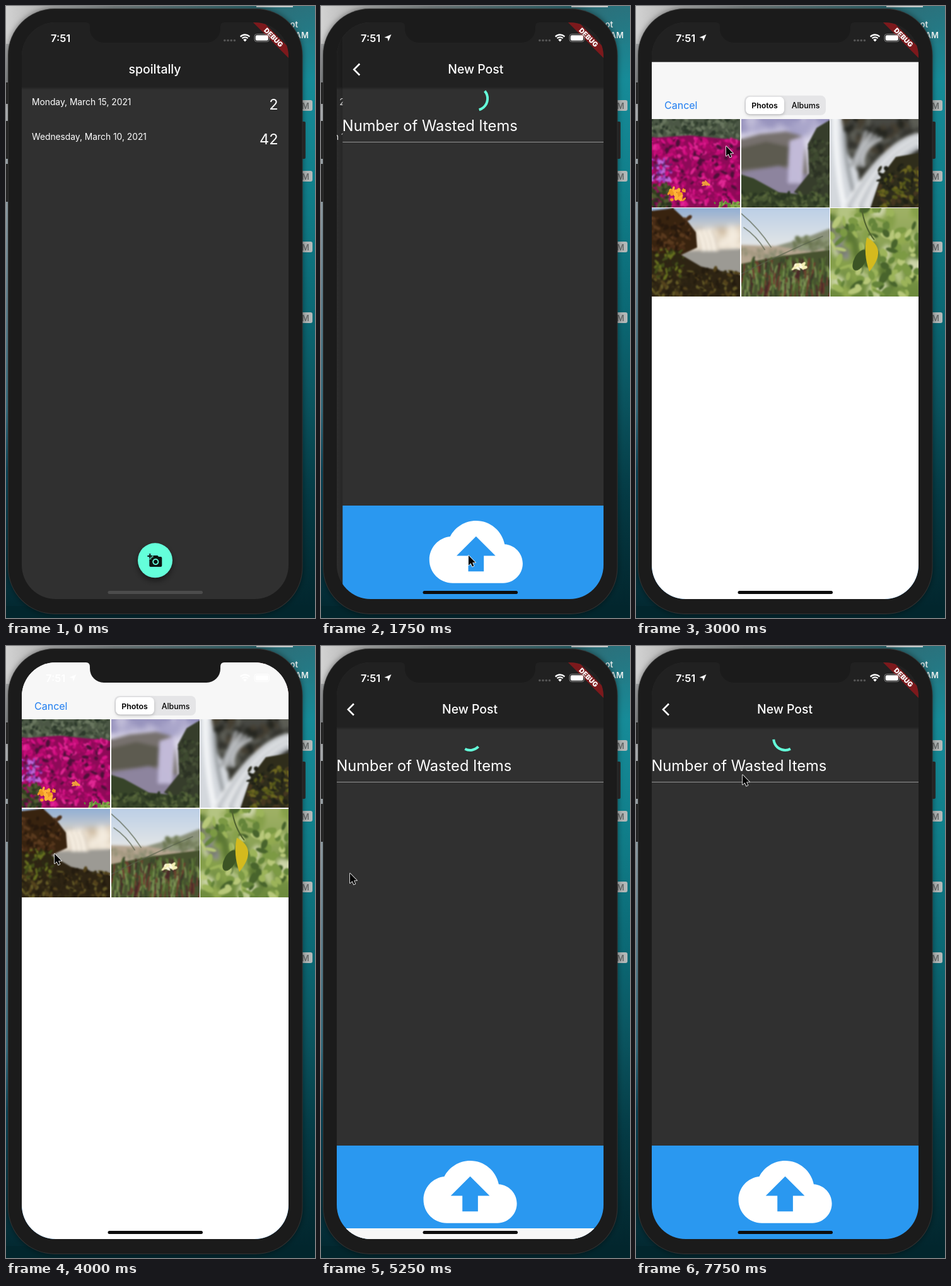
Write an HTML page with a canvas that moves like this. It is 490 by 969 pixels and loops after 8000 ms.

```html
<!DOCTYPE html>
<html lang="en">
<head>
<meta charset="utf-8">
<title>Food log demo</title>
<style>
html, body { margin: 0; width: 100%; height: 100%; overflow: hidden; background: #1b1b1b; }
canvas { display: block; width: 490px; height: 969px; }
</style>
</head>
<body>
<canvas id="stage" width="490" height="969"></canvas>
<script>
const ctx = document.getElementById('stage').getContext('2d');
const LOOP = 8000, STEP = 250;
const SCREEN = { x: 25, y: 26, w: 423, h: 913 };
const MID = SCREEN.x + SCREEN.w / 2;
const CELL = 140, PITCH = 141.5;

const CLOUD = new Path2D('M19.35 10.04C18.67 6.59 15.64 4 12 4 9.11 4 6.6 5.64 5.35 8.04 2.34 8.36 0 10.91 0 14c0 3.31 2.69 6 6 6h13c2.76 0 5-2.24 5-5 0-2.64-2.05-4.78-4.65-4.96zM14 13v4h-4v-4H7l5-5 5 5h-3z');
const CAMERA = new Path2D('M3 4V1h2v3h3v2H5v3H3V6H0V4h3zm3 6V7h3V4h7l1.83 2H21c1.1 0 2 .9 2 2v12c0 1.1-.9 2-2 2H5c-1.1 0-2-.9-2-2V10h3zm7 9c2.76 0 5-2.24 5-5s-2.24-5-5-5-5 2.24-5 5 2.24 5 5 5zm-3.2-5c0 1.77 1.43 3.2 3.2 3.2s3.2-1.43 3.2-3.2-1.43-3.2-3.2-3.2-3.2 1.43-3.2 3.2z');
const POINTER = new Path2D('M0 0V15.5L3.6 12.2 6 17.6 8.4 16.5 6.1 11.3H11z');
const LOCATION = new Path2D('M111.5 45L106.8 56 105.6 50.9 100.5 49.7z');

// Cursor: time, x, y
const CURSOR = [[250, 193, 203], [500, 256, 400], [750, 250, 700], [1000, 234, 870], [1750, 234, 870],
  [2500, 143, 222], [3000, 143, 222], [4000, 77, 329], [4500, 46, 360], [5500, 46, 360], [6500, 169, 204]];
// Spinner clock: time, elapsed
const SPIN = [[1530, 0], [2750, 1190], [5250, 3645], [7750, 6255]];

const clamp = v => Math.min(1, Math.max(0, v));
const smooth = v => v * v * (3 - 2 * v);
const linear = v => v;

function track(keys, t, ease) {
  let i = 0;
  while (i < keys.length - 2 && t > keys[i + 1][0]) i++;
  const [a, b] = [keys[i], keys[i + 1]];
  const k = ease(clamp((t - a[0]) / (b[0] - a[0])));
  return a.slice(1).map((v, n) => v + (b[n + 1] - v) * k);
}

function bezier(x1, y1, x2, y2) {
  const at = (s, p, q) => 3 * s * (1 - s) * (1 - s) * p + 3 * s * s * (1 - s) * q + s * s * s;
  return x => {
    if (x <= 0 || x >= 1) return clamp(x);
    let lo = 0, hi = 1;
    for (let i = 0; i < 24; i++) {
      const m = (lo + hi) / 2;
      if (at(m, x1, x2) < x) lo = m; else hi = m;
    }
    return at(lo, y1, y2);
  };
}
const pushEase = bezier(0.35, 0.91, 0.33, 0.97);
const arcEase = bezier(0.4, 0, 0.2, 1);

// Share of the distance still to go for a critically damped spring
function spring(seconds, speed) {
  const x = Math.max(0, seconds) * speed;
  return (1 + x) * Math.exp(-x);
}

function gradient(c, x0, y0, x1, y1, stops) {
  const g = c.createLinearGradient(x0, y0, x1, y1);
  stops.forEach(([at, color]) => g.addColorStop(at, color));
  return g;
}
function rect(x, y, w, h, color) {
  ctx.fillStyle = color;
  ctx.fillRect(x, y, w, h);
}
function round(x, y, w, h, r, color) {
  ctx.beginPath();
  ctx.roundRect(x, y, w, h, r);
  ctx.fillStyle = color;
  ctx.fill();
}
function text(str, x, y, font, color = '#fff', align = 'left') {
  ctx.font = font + ' Inter, sans-serif';
  ctx.fillStyle = color;
  ctx.textAlign = align;
  ctx.fillText(str, x, y);
}
function icon(path, x, y, scale, color) {
  ctx.save();
  ctx.translate(x, y);
  ctx.scale(scale, scale);
  ctx.fillStyle = color;
  ctx.fill(path);
  ctx.restore();
}

// Photos: soft gradients with a few shapes, painted once on 140 px tiles
function photo(seed, paint) {
  const tile = document.createElement('canvas');
  tile.width = tile.height = 140;
  const c = tile.getContext('2d');
  const rnd = () => (seed = seed * 16807 % 2147483647) / 2147483647;
  const fill = (top, bottom, end = 140) => {
    c.fillStyle = gradient(c, 0, 0, 0, end, [[0, top], [1, bottom]]);
    c.fillRect(0, 0, 140, 140);
  };
  const poly = (color, ...pts) => {
    c.fillStyle = color;
    c.beginPath();
    for (let i = 0; i < pts.length; i += 2) c.lineTo(pts[i], pts[i + 1]);
    c.fill();
  };
  const blobs = (n, x, y, w, h, size, colors) => {
    for (let i = 0; i < n; i++) {
      c.fillStyle = colors[i % colors.length];
      c.beginPath();
      c.ellipse(x + rnd() * w, y + rnd() * h, size * (0.5 + rnd()), size * (0.3 + rnd() * 0.5), rnd() * 3, 0, 7);
      c.fill();
    }
  };
  const sweep = (color, width, x0, y0, cx, cy, x1, y1) => {
    c.strokeStyle = color;
    c.lineWidth = width;
    c.beginPath();
    c.moveTo(x0, y0);
    c.quadraticCurveTo(cx, cy, x1, y1);
    c.stroke();
  };
  const soften = px => {
    c.filter = `blur(${px}px)`;
    c.drawImage(tile, 0, 0);
    c.filter = 'none';
  };
  paint({ c, rnd, fill, poly, blobs, sweep, soften });
  return tile;
}

const photos = [
  photo(11, ({ fill, poly, blobs, soften }) => {
    fill('#4c5846', '#3c4a38');
    blobs(160, 0, 0, 140, 28, 4, ['#3a4735', '#69765f', '#2b382a', '#55634c']);
    poly('#8e0a58', 0, 30, 60, 26, 140, 34, 140, 140, 0, 140);
    blobs(480, 0, 32, 140, 104, 4.5, ['#c50c78', '#d81488', '#8c0a58', '#b20a6c', '#e02894', '#4c1038', '#a60864']);
    blobs(45, 0, 64, 34, 34, 3.5, ['#a244c4', '#bc68d8', '#5a2868']);
    blobs(70, 0, 104, 30, 36, 4, ['#33421f', '#4f5c30', '#2a3420']);
    soften(0.8);
    blobs(26, 28, 110, 24, 18, 4, ['#f09a24', '#ffb438']);
    blobs(7, 80, 100, 9, 5, 3, ['#f0a03c']);
    blobs(22, 100, 132, 40, 8, 4, ['#5e8a38', '#86a64a']);
  }),
  photo(23, ({ fill, poly, blobs, sweep, soften }) => {
    fill('#8c88b6', '#dcd8ea', 28);
    blobs(16, 0, 4, 130, 14, 16, ['#a9a5ca', '#9793bd', '#c0bcd8']);
    soften(4);
    poly('#77716e', 0, 32, 30, 24, 72, 20, 100, 28, 112, 140, 0, 140);
    poly('#5d5b50', 0, 46, 40, 36, 76, 44, 76, 74, 0, 80);
    poly('#8d849e', 0, 84, 60, 74, 108, 90, 96, 124, 24, 118);
    for (let i = 0; i < 8; i++) sweep(i % 2 ? '#cfc8e2' : '#b4acce', 4.5, 79 + i * 3, 34 - i, 77 + i * 3, 60, 76 + i * 2.6, 102);
    soften(2.5);
    poly('#363d2b', 140, 2, 120, 14, 106, 40, 108, 86, 84, 116, 140, 140);
    poly('#374429', 0, 88, 20, 94, 60, 116, 140, 124, 140, 140, 0, 140);
    blobs(110, 0, 116, 140, 26, 4, ['#4a5a34', '#2a3622', '#58673c']);
    blobs(70, 110, 34, 30, 80, 4, ['#485238', '#2b3124', '#3e4a30']);
    soften(1);
  }),
  photo(37, ({ fill, poly, blobs, sweep, soften }) => {
    fill('#484944', '#2b2b22');
    blobs(70, 22, 0, 118, 70, 8, ['#33332e', '#5c5d55', '#453f32', '#24251f']);
    soften(1);
    poly('#d4d8dd', 0, 0, 18, 0, 26, 50, 44, 84, 52, 140, 0, 140);
    sweep('#9da2a6', 6, 22, 20, 24, 80, 44, 140);
    sweep('#f2f4f6', 9, 8, 0, 8, 70, 22, 140);
    for (let i = 0; i < 8; i++) sweep(['#e8eaec', '#bfc3c8', '#d8dbde'][i % 3], 8, 140, 26 + i * 2.4, 86, 38 + i * 5, 24 + i * 6, 140);
    for (let i = 0; i < 4; i++) sweep(i % 2 ? '#c2c5c8' : '#a6a9ac', 5, 58 + i * 8, 18 + i * 4, 46, 48, 32 + i * 7, 76);
    soften(2.5);
    poly('#2f2d1b', 140, 54, 104, 60, 80, 92, 64, 140, 140, 140);
    blobs(110, 78, 76, 62, 64, 5, ['#56591a', '#29291a', '#6c6620', '#443620', '#1f2016']);
    soften(1);
  }),
  photo(41, ({ fill, poly, blobs, sweep, soften }) => {
    fill('#8fadd4', '#e8dccb', 44);
    poly('#c9b498', 66, 34, 140, 28, 140, 50, 70, 48);
    blobs(18, 78, 36, 62, 26, 12, ['#efe4d4', '#dccdb8', '#f4ecdf']);
    soften(4);
    poly('#9c9a94', 40, 68, 140, 64, 140, 112, 70, 100);
    for (let i = 0; i < 7; i++) sweep(i % 2 ? '#fff8ec' : '#e2d8ca', 5, 70 + i * 4, 35, 77 + i * 4, 44, 80 + i * 4, 68);
    soften(2);
    poly('#38230f', 0, 4, 34, 0, 58, 22, 70, 38, 72, 62, 46, 74, 0, 90);
    poly('#2e2413', 0, 70, 44, 72, 78, 92, 140, 106, 140, 140, 0, 140);
    blobs(90, 0, 14, 60, 56, 4, ['#4a2d17', '#28190d', '#5a3a1e']);
    blobs(180, 0, 96, 136, 44, 4, ['#54431c', '#241c0f', '#645a26', '#382f16', '#2a2212']);
    blobs(60, 6, 64, 44, 46, 3.5, ['#66701f', '#434f1a', '#2c2813']);
    soften(0.8);
  }),
  photo(53, ({ rnd, fill, poly, blobs, sweep, soften }) => {
    fill('#bccfe6', '#e2e5e6', 60);
    poly('#8b917b', 40, 64, 76, 54, 104, 46, 140, 32, 140, 80, 40, 80);
    poly('#b5a590', 0, 58, 60, 60, 106, 68, 140, 64, 140, 92, 0, 92);
    blobs(50, 84, 46, 56, 20, 5, ['#77805f', '#8f9a78', '#69744f']);
    blobs(30, 0, 66, 70, 12, 5, ['#8b8d72', '#a59a82']);
    soften(1.5);
    poly('#47522f', 0, 88, 60, 76, 140, 66, 140, 140, 0, 140);
    for (let i = 0; i < 260; i++) {
      const x = rnd() * 140, y = 76 + rnd() * 56;
      sweep(['#64803e', '#35432a', '#74392e', '#829858', '#4c2828', '#50682f'][i % 6], 2.2, x, y + 18, x + 1, y + 8, x + rnd() * 8 - 3, y);
    }
    soften(0.8);
    [[0, 8, 48, 62], [4, 30, 38, 66], [130, 44, 0, 104]].forEach(([x, y, u, v]) => sweep('#56604a', 1.2, x, y, (x + u) / 2 + 4, (y + v) / 2 - 4, u, v));
    blobs(16, 84, 89, 18, 7, 4, ['#f4eeb4', '#fffbe0']);
  }),
  photo(67, ({ c, fill, blobs, sweep, soften }) => {
    fill('#a0b266', '#6c8a3c');
    blobs(50, 0, 0, 140, 140, 16, ['#b4c482', '#86a04a', '#5c7834', '#ccd4a8', '#92aa50']);
    blobs(12, 0, 25, 22, 60, 9, ['#8a8a90', '#757a68']);
    soften(3);
    blobs(110, 0, 0, 140, 140, 8, ['#64843a', '#9cb45a', '#48642c', '#b8c87a', '#7c9a44']);
    soften(1.2);
    sweep('#4f6230', 2, 50, 0, 54, 30, 70, 50);
    c.fillStyle = '#3c5424';
    c.beginPath(); c.ellipse(47, 82, 9, 18, 0.5, 0, 7); c.fill();
    c.fillStyle = '#d4ba1e';
    c.beginPath(); c.moveTo(58, 46); c.quadraticCurveTo(92, 64, 62, 100); c.quadraticCurveTo(52, 72, 58, 46); c.fill();
    soften(0.6);
  })
];

function desktop() {
  rect(0, 0, 490, 969, gradient(ctx, 0, 0, 0, 969, [[0, '#2a727d'], [0.12, '#168b98'], [0.3, '#107e8a'], [0.5, '#0b6874'], [0.65, '#0a535e'], [0.8, '#043a44'], [1, '#02242b']]));
  rect(0, 0, 120, 969, gradient(ctx, 0, 0, 0, 969, [[0, '#cfcfcf'], [0.12, '#8b8e90'], [0.17, '#c8cccf'], [0.33, '#a3b4bd'], [0.48, '#7296a6'], [0.66, '#3d7d92'], [0.76, '#0b4f66'], [1, '#02262d']]));
  rect(0, 0, 490, 60, gradient(ctx, 0, 0, 490, 0, [[0, '#d2d2d2'], [0.12, '#b4b4b4'], [0.35, '#7d8586'], [0.8, 'rgba(47,102,109,.9)'], [1, 'rgba(42,114,125,0)']]));
  rect(0, 950, 490, 19, '#02262d');
  rect(397, 0, 58, 2, '#c9cdce');
  text('ot', 463, 34, '600 13px', '#e8eeee', 'right');
  text('AM', 480, 51, '600 13px', '#e8eeee', 'right');
  for (let i = 0; i < 4; i++) {
    round(440, 149 + i * 112, 46, 17, 3, '#b3b8b8');
    text('M', 481, 162.5 + i * 112, '600 13px', '#686c6c', 'right');
  }
}

function phone() {
  [[121, 34], [182, 60], [250, 60]].forEach(([y, h]) => rect(0, y, 6, h, '#2b2b2b'));
  round(464, 183, 11, 59, 2, '#2b2b2b');
  ctx.save();
  ctx.shadowColor = 'rgba(0,0,0,.45)';
  ctx.shadowBlur = 10;
  round(3, 4, 467.5, 959, 74, '#333');
  ctx.restore();
  round(4, 5, 465.5, 957, 73, '#1b1b1b');
}

function appBar(title) {
  rect(SCREEN.x, 128, SCREEN.w, 5, gradient(ctx, 0, 128, 0, 133, [[0, 'rgba(0,0,0,.3)'], [1, 'rgba(0,0,0,0)']]));
  rect(SCREEN.x, 26, SCREEN.w, 102.4, '#212121');
  text(title, MID - 0.5, 107, '500 19.4px', '#fff', 'center');
}

function listPage() {
  rect(SCREEN.x, 26, SCREEN.w, 913, '#303030');
  appBar('spoiltally');
  [['Monday, March 15, 2021', '2'], ['Wednesday, March 10, 2021', '42']].forEach(([day, count], i) => {
    text(day, 41, 157 + i * 55, '400 13.8px');
    text(count, 431.5, 164 + i * 55, '400 23.5px', '#fff', 'right');
  });
  ctx.save();
  ctx.shadowColor = 'rgba(0,0,0,.45)';
  ctx.shadowBlur = 10;
  ctx.shadowOffsetY = 5;
  round(MID - 27.5, 850.3, 55, 55, 27.5, '#64ffda');
  ctx.restore();
  icon(CAMERA, 224.3, 866, 1, '#0c1512');
}

function spinner(elapsed) {
  const u = elapsed / 1333 % 1, turn = elapsed / 2222 % 1;
  const head = arcEase(clamp(u * 2)), tail = arcEase(clamp(u * 2 - 1));
  const start = Math.PI * (-0.5 + 1.5 * tail + 2 * turn + 0.5 * u);
  ctx.beginPath();
  ctx.arc(MID, 146.6, 18.3, start, start + Math.max(1.5 * Math.PI * (head - tail), 0.001));
  ctx.strokeStyle = '#64ffda';
  ctx.lineWidth = 4;
  ctx.stroke();
}

function postPage(t) {
  rect(SCREEN.x - 14, 26, 14, 913, gradient(ctx, SCREEN.x - 14, 0, SCREEN.x, 0, [[0, 'rgba(0,0,0,0)'], [1, 'rgba(0,0,0,.2)']]));
  rect(SCREEN.x, 26, SCREEN.w, 913, '#303030');
  spinner(track(SPIN, t, linear)[0]);
  appBar('New Post');
  ctx.beginPath();
  ctx.moveTo(52, 91.5);
  ctx.lineTo(43, 100.5);
  ctx.lineTo(52, 109.5);
  ctx.strokeStyle = '#fff';
  ctx.lineWidth = 2.6;
  ctx.stroke();
  text('Number of Wasted Items', 24.5, 198, '400 23.7px');
  rect(SCREEN.x, 215, SCREEN.w, 1, '#949494');
  rect(SCREEN.x, 791, SCREEN.w, 148, '#2a98f0');
  icon(CLOUD, 162.5, 790.3, 6.17, '#fff');
}

function debugBanner() {
  ctx.save();
  ctx.translate(447.5, 26.5);
  ctx.rotate(Math.PI / 4);
  rect(-45, 27, 90, 12, '#7c191c');
  text('DEBUG', 0, 36.8, '900 10.8px', '#fff', 'center');
  ctx.restore();
}

function picker() {
  rect(SCREEN.x, 26, SCREEN.w, 913, '#fff');
  rect(SCREEN.x, 26, SCREEN.w, 90, '#f7f7f7');
  text('Cancel', 45, 100.5, '400 16px', '#1f7df0');
  round(172, 79, 129, 31, 8, '#e5e5e7');
  ctx.save();
  ctx.shadowColor = 'rgba(0,0,0,.2)';
  ctx.shadowBlur = 5;
  ctx.shadowOffsetY = 2;
  round(174, 81, 61, 27.5, 7, '#fff');
  ctx.restore();
  text('Photos', 204, 99.5, '600 12.4px', '#000', 'center');
  text('Albums', 269, 99.5, '500 12.4px', '#000', 'center');
  photos.forEach((tile, i) => ctx.drawImage(tile, SCREEN.x + i % 3 * PITCH, 116 + Math.floor(i / 3) * PITCH, CELL, CELL));
}

function statusBar(located, light) {
  text('7:51', located ? 63 : 71, 56.5, '600 16.5px');
  if (located) icon(LOCATION, 0, 0, 1, '#fff');
  if (!light) for (let i = 0; i < 4; i++) round(345 + i * 5.2, 52.7, 3.6, 3.6, 1.8, '#555');
  ctx.strokeStyle = ctx.fillStyle = '#fff';
  ctx.lineWidth = 2.3;
  [10, 6.2].forEach(r => {
    ctx.beginPath();
    ctx.arc(379, 55.5, r, -Math.PI * 0.76, -Math.PI * 0.24);
    ctx.stroke();
  });
  ctx.beginPath();
  ctx.moveTo(379, 56.5);
  ctx.arc(379, 56, 3.8, -Math.PI * 0.77, -Math.PI * 0.23);
  ctx.fill();
  ctx.beginPath();
  ctx.roundRect(394, 44.5, 23.5, 12, 3.6);
  ctx.strokeStyle = light ? '#fff' : '#858585';
  ctx.lineWidth = 1;
  ctx.stroke();
  round(395.7, 46.2, 20.1, 8.6, 2.2, '#fff');
}

function notch() {
  ctx.beginPath();
  ctx.moveTo(127, 26);
  ctx.quadraticCurveTo(133, 26, 133, 33);
  ctx.arcTo(133, 58, 158, 58, 22);
  ctx.arcTo(340, 58, 340, 33, 22);
  ctx.lineTo(340, 33);
  ctx.quadraticCurveTo(340, 26, 346, 26);
  ctx.fillStyle = '#1b1b1b';
  ctx.fill();
}

function shifted(dx, dy, paint) {
  ctx.save();
  ctx.translate(dx, dy);
  paint();
  ctx.restore();
}

function draw(t) {
  const push = pushEase(clamp((t - 1465) / 400));
  const shown = t < 4954 ? 1 - spring((t - 2689) / 1000, 14) : spring((t - 4954) / 1000, 20);
  const drop = SCREEN.h * (1 - shown);
  const located = t >= 1500;

  desktop();
  phone();
  ctx.save();
  ctx.beginPath();
  ctx.roundRect(SCREEN.x, SCREEN.y, SCREEN.w, SCREEN.h, 54);
  ctx.clip();
  if (push < 1) shifted(-SCREEN.w / 3 * push, 0, listPage);
  if (push > 0) shifted(SCREEN.w * (1 - push), 0, () => postPage(t));
  debugBanner();
  if (shown > 0.001) shifted(0, drop, picker);
  statusBar(located, drop < 20);
  notch();
  round(161.5, 926, 150.5, 5, 2.5, located ? '#0d0d0d' : '#4c4c4c');
  ctx.restore();

  if (t >= 250) shifted(...track(CURSOR, t, smooth), () => {
    ctx.strokeStyle = '#fff';
    ctx.lineWidth = 1.6;
    ctx.lineJoin = 'round';
    ctx.stroke(POINTER);
    ctx.lineJoin = 'miter';
    ctx.fillStyle = '#000';
    ctx.fill(POINTER);
  });
}

const began = performance.now();
function frame() {
  const t = (performance.now() - began) % LOOP;
  draw(Math.floor(t / STEP) * STEP);
  requestAnimationFrame(frame);
}
frame();
</script>
</body>
</html>
```
